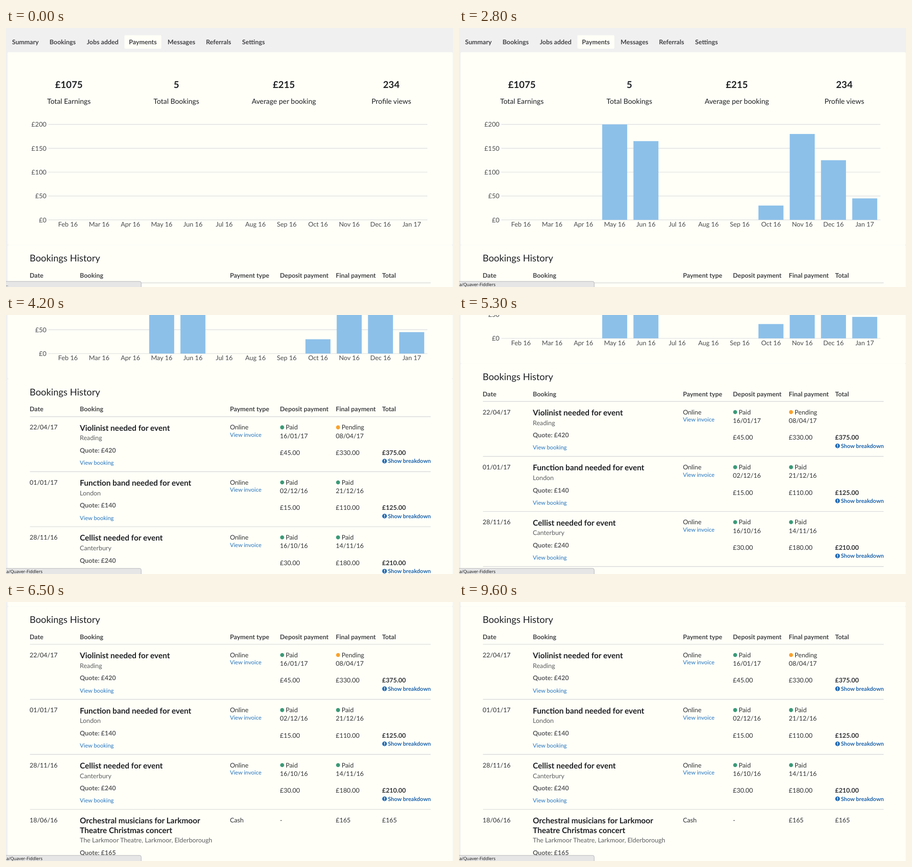
Recreate the animation shown at these times as an HTML page. Size 960 px wide and 557 px high, loop 9700 ms.

```html
<!DOCTYPE html>
<html lang="en">
<head>
<meta charset="utf-8">
<title>Payments</title>
<style>
html, body { margin: 0; width: 100%; height: 100%; overflow: hidden; background: #f0f0f1; }
svg { display: block; width: 960px; height: 557px; }
text { font-family: Lato, sans-serif; font-size: 13.7px; fill: #303033; text-rendering: geometricPrecision; }
.b { font-weight: 700; }
.nav { fill: #434346; }
.big { font-size: 20.4px; fill: #1e2023; }
.title { font-size: 20.15px; fill: #1e2023; }
.label { font-size: 15.3px; fill: #1e2023; }
.axis { font-size: 13.9px; fill: #4a4a4d; }
.job { font-size: 16.9px; fill: #1e2023; }
.soft { fill: #5c5c5f; }
.link { font-size: 12.2px; fill: #2474bf; }
.more { font-size: 12px; fill: #1b62ab; }
.status { font-family: "Open Sans", sans-serif; font-size: 9.3px; fill: #111; }
</style>
</head>
<body>
<svg id="stage" viewBox="0 0 960 557" xmlns="http://www.w3.org/2000/svg"></svg>
<script>
const NS = 'http://www.w3.org/2000/svg';
const LOOP = 9700, STEP = 100;
const PAPER = '#fffff8';
const stage = document.getElementById('stage');

function add(parent, tag, attrs) {
  const el = document.createElementNS(NS, tag);
  for (const k in attrs) el.setAttribute(k, attrs[k]);
  parent.appendChild(el);
  return el;
}
function text(parent, x, y, str, cls = '', anchor = 'start') {
  const el = add(parent, 'text', { x, y, class: cls, 'text-anchor': anchor });
  el.textContent = str;
  return el;
}
const rect = (parent, x, y, width, height, fill, rx = 0) =>
  add(parent, 'rect', { x, y, width, height, fill, rx });
const rule = (parent, x1, x2, y, stroke) =>
  add(parent, 'line', { x1, x2, y1: y, y2: y, stroke, 'stroke-width': 1.2 });

rect(stage, 0, 0, 960, 557, '#f0f0f1');
const page = add(stage, 'g', {});

// Navigation and panels
rect(page, 254.5, 15.5, 79, 29, PAPER, 2);
[['Summary', 13], ['Bookings', 93.4], ['Jobs added', 173.4], ['Payments', 264],
 ['Messages', 347.1], ['Referrals', 429.4], ['Settings', 507]]
  .forEach(([name, x]) => text(page, x, 35.2, name, 'b nav'));
rect(page, 3.5, 52, 956, 414.7, PAPER, 3);
rect(page, 3.5, 466.7, 956, 700, PAPER, 3);

// Headline figures
[['£1075', 'Total Earnings'], ['5', 'Total Bookings'],
 ['£215', 'Average per booking'], ['234', 'Profile views']].forEach(([value, name], i) => {
  const x = 135 + i * 230.85;
  text(page, x, 129.2, value, 'b big', 'middle');
  text(page, x, 162.7, name, 'label', 'middle');
});

// Chart
const BASE = 412.6, UNIT = 205.2 / 200, GAP = 67.13;
for (let v = 0; v <= 200; v += 50) {
  const y = BASE - v * UNIT;
  rule(page, 91, 905, y, '#dadade');
  text(page, 86.8, y + 4.9, '£' + v, 'axis', 'end');
}
const months = 'Feb Mar Apr May Jun Jul Aug Sep Oct Nov Dec Jan'.split(' ');
const income = [0, 0, 0, 200, 165, 0, 0, 0, 30, 180, 125, 45];
const bars = income.map((value, i) => {
  const x = 133 + i * GAP;
  text(page, x, 427, months[i] + (i < 11 ? ' 16' : ' 17'), 'axis', 'middle');
  return { value, el: rect(page, x - 26.9, BASE, 53.7, 0, '#8cc0e9') };
});

// Bookings table
const COL = [50.8, 158.5, 480.9, 588.3, 708.3, 807.7];
text(page, 50.8, 502.4, 'Bookings History', 'title');
['Date', 'Booking', 'Payment type', 'Deposit payment', 'Final payment', 'Total']
  .forEach((name, i) => text(page, COL[i], 537, name, 'b nav'));
rule(page, 51.5, 912, 548.2, '#d2d2d6');

function payment(g, x, state, date, amount) {
  add(g, 'circle', { cx: x + 4.8, cy: 571.2, r: 4.3, fill: state === 'Paid' ? '#3c9a78' : '#f9a22e' });
  text(g, x + 12.5, 576, state);
  text(g, x, 594.2, date);
  text(g, x, 630.6, amount);
}
function booking(i, date, title, place, quote, how) {
  const g = add(page, 'g', { transform: `translate(0 ${i * 118.35})` });
  const shift = (title.length - 1) * 20.3;
  text(g, COL[0], 576, date);
  title.forEach((line, k) => text(g, COL[1], 578.4 + k * 20.3, line, 'b job'));
  text(g, COL[1], 599 + shift, place, 'soft');
  text(g, COL[1], 625.7 + shift, 'Quote: ' + quote, 'b soft');
  text(g, COL[1], 651.8 + shift, 'View booking', 'link');
  text(g, COL[2], 576, how);
  return g;
}
function online(i, date, title, place, quote, deposit, final, total) {
  const g = booking(i, date, [title], place, quote, 'Online');
  text(g, COL[2], 591.7, 'View invoice', 'link');
  payment(g, COL[3], ...deposit);
  payment(g, COL[4], ...final);
  text(g, COL[5], 630.6, total, 'b');
  add(g, 'circle', { cx: 813, cy: 643.8, r: 5, fill: '#1f69b3' });
  rect(g, 812.2, 640.6, 1.6, 3.9, PAPER);
  rect(g, 812.2, 645.5, 1.6, 1.5, PAPER);
  text(g, 820.2, 648, 'Show breakdown', 'b more');
  rule(g, 51.5, 912, 666.5, '#d2d2d6');
}
online(0, '22/04/17', 'Violinist needed for event', 'Reading', '£420',
  ['Paid', '16/01/17', '£45.00'], ['Pending', '08/04/17', '£330.00'], '£375.00');
online(1, '01/01/17', 'Function band needed for event', 'London', '£140',
  ['Paid', '02/12/16', '£15.00'], ['Paid', '21/12/16', '£110.00'], '£125.00');
online(2, '28/11/16', 'Cellist needed for event', 'Canterbury', '£240',
  ['Paid', '16/10/16', '£30.00'], ['Paid', '14/11/16', '£180.00'], '£210.00');
const last = booking(3, '18/06/16', ['Orchestral musicians for Larkmoor', 'Theatre Christmas concert'],
  'The Larkmoor Theatre, Larkmoor, Elderborough', '£165', 'Cash');
['-', '£165', '£165'].forEach((s, i) => text(last, COL[3 + i], 576, s));

// Browser status strip
add(stage, 'path', { d: 'M-1 545H287Q290.4 545 290.4 548.4V558H-1Z', fill: '#e6e6e7', stroke: '#b2b2b4' });
const dots = text(stage, -3, 555, '...', 'status');
const address = text(stage, 78.5, 555, 'a/Quaver-Fiddlers', 'status', 'end');

const easeOut = (t, start, span, power) =>
  1 - Math.pow(1 - Math.min(1, Math.max(0, (t - start) / span)), power);

function draw(t) {
  const grow = easeOut(t, 780, 1000, 4);
  for (const { value, el } of bars) {
    const h = value * UNIT * grow;
    el.setAttribute('y', BASE - h);
    el.setAttribute('height', h);
  }
  const scroll = 329.6 * easeOut(t, 2903, 1097, 2) + 127.6 * easeOut(t, 5124, 1276, 2);
  page.setAttribute('transform', `translate(0 ${-scroll.toFixed(2)})`);
  const known = t >= 700;
  dots.setAttribute('visibility', known ? 'hidden' : 'visible');
  address.setAttribute('visibility', known ? 'visible' : 'hidden');
}

const begin = performance.now();
function tick() {
  const t = (performance.now() - begin) % LOOP;
  draw(Math.floor(t / STEP) * STEP);
  requestAnimationFrame(tick);
}
draw(0);
requestAnimationFrame(tick);
</script>
</body>
</html>
```
